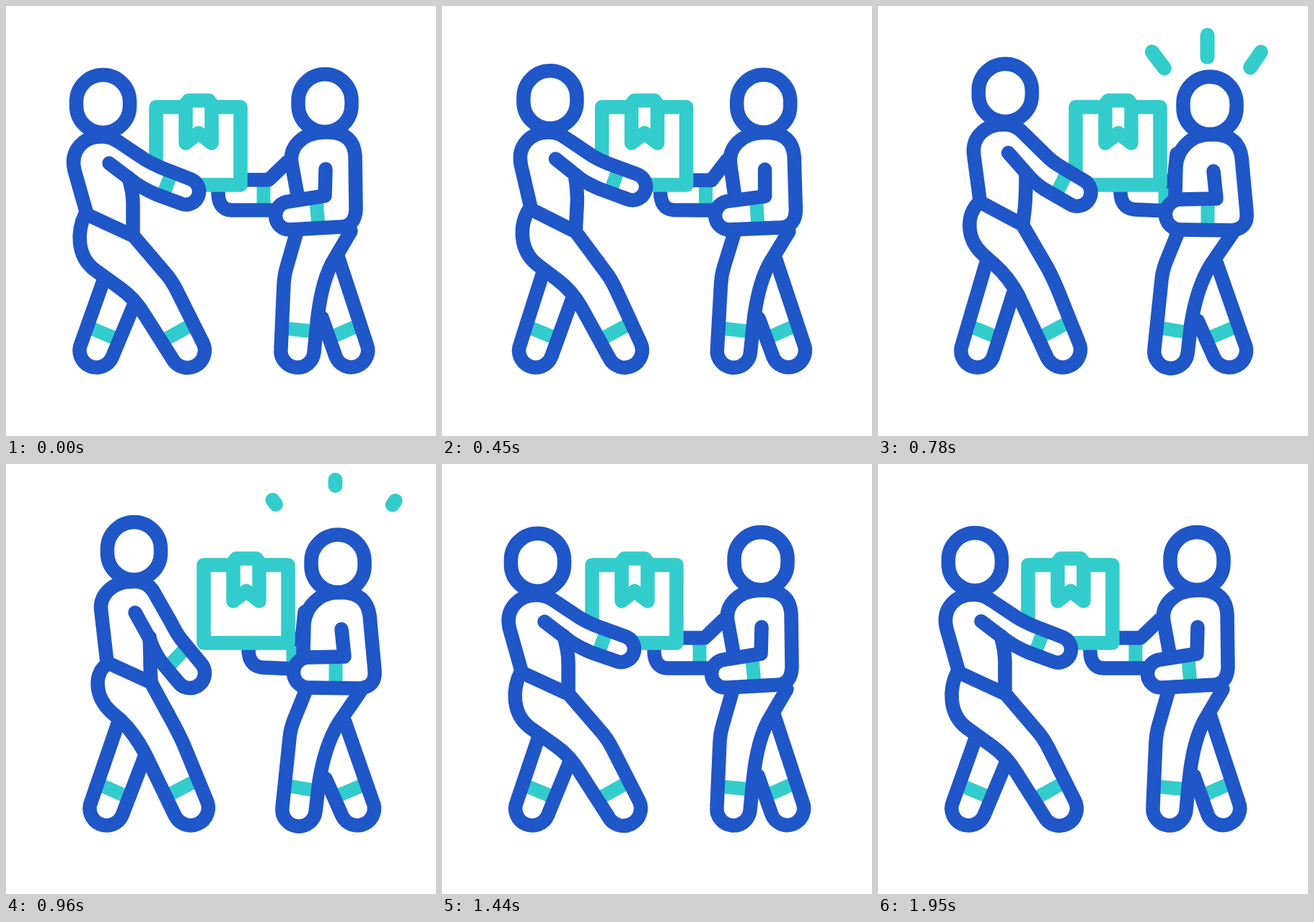
Animation of 596x596 px, one loop 2250 ms. Source, as an HTML page with a canvas:

```html
<!DOCTYPE html>
<html>
<head>
<meta charset="utf-8">
<style>
html, body { margin: 0; width: 100%; height: 100%; overflow: hidden; background: #fff; }
canvas { display: block; }
</style>
</head>
<body>
<canvas id="stage" width="596" height="596"></canvas>
<script>
const ctx = document.getElementById('stage').getContext('2d');
const BLUE = '#1f56c8', TEAL = '#33cccc', LOOP = 2250, STEP = 30;

const head = (x, y) =>
  `M${x - 37} ${y + 3}v-6a37 37 0 0 1 74 0v6a37 37 0 0 1 -74 0z`;

// Poses: resting, leaning back, stretched while holding, arms released.
// Arcs of radius 1 grow to half circles between their end points.
const left = {
  backLeg: [
    'M136 378L104 468A1 1 0 0 0 147 487L180 408',
    'M125 378L102 470A1 1 0 0 0 145 486L174 406',
    'M147 353L115 470A1 1 0 0 0 158 486L184 396',
    'M155 360L118 468A1 1 0 0 0 161 487L192 406'],
  backBand: [
    'M114 445L157 463', 'M111 444L153 461', 'M124 443L165 459', 'M129 444L170 462'],
  frontLeg: [
    'M110 288C98 312 98 346 122 365L158 391Q178 405 192 428L230 488A1 1 0 0 0 273 467L238 397Q230 380 218 367L177 319Z',
    'M105 290C93 314 93 346 118 364L158 391Q170 399 186 423L229 487A1 1 0 0 0 274 467L234 395Q227 381 216 370L170 320Z',
    'M138 270C120 290 120 325 144 346L162 362Q182 378 196 404L234 487A1 1 0 0 0 278 466L250 396Q243 378 236 366L198 304Z',
    'M142 276C121 289 122 322 146 344L160 356Q178 374 192 400L234 487A1 1 0 0 0 278 466L246 388Q240 375 231 358L201 303Z'],
  frontBand: [
    'M219 463L257 442', 'M218 463L256 441', 'M225 459L263 439', 'M225 459L263 439'],
  body: [
    'M112 288L95 228C88 200 108 180 134 181Q146 181 157 189L193 213Q203 219 215 224L256 240A1 1 0 0 1 243 274L208 261Q192 254 180 246L143 218',
    'M104 290L88 231C80 202 104 184 126 185Q138 185 149 193L184 215Q194 221 206 225L249 236A1 1 0 0 1 237 271L202 262Q186 257 174 250L137 221',
    'M140 268L131 210C127 184 146 165 172 166Q184 166 195 175L232 200Q242 206 253 210L292 223A1 1 0 0 1 280 259L238 244Q222 238 211 231L179 203',
    'M140 275L132 205C128 182 148 163 174 163Q194 161 204 176L229 220Q236 234 242 242L270 276A1 1 0 0 1 240 304L215 274Q205 260 199 242L179 206'],
  armBand: [
    'M230 230L217 264', 'M223 227L212 262', 'M268 215L257 250', 'M252 252L224 282'],
  belly: [
    'M176 318L176 275Q176 258 170 238', 'M171 320L171 280Q170 258 163 240',
    'M199 304L204 275Q206 255 206 232', 'M201 303L200 280Q200 262 199 240'],
  head: [head(134.5, 135.5), head(123.5, 139), head(173, 121), head(177.5, 120.5)]
};

// Poses: box given away, box pulled close
const right = {
  rearArm: [
    'M390 216L364 241L330 241M375 283L312 283Q294 282 294 258',
    'M414 205L410 243L395 243M400 284L355 282Q336 280 336 256'],
  rearBand: ['M357 243L357 280', 'M398 245L398 280'],
  backLeg: [
    'M461 350L500 469A1 1 0 0 1 457 486L438 432',
    'M470 358L508 467A1 1 0 0 1 466 488L443 436'],
  backBand: ['M449 460L492 441', 'M455 462L497 444'],
  frontLeg: [
    'M403 313L389 362Q386 372 385 385L381 476A1 1 0 0 0 427 480L431 440Q436 388 451 358L478 312',
    'M416 313L399 355Q394 368 393 380L383 476A1 1 0 0 0 429 482L434 440Q442 390 461 359L492 314'],
  frontBand: ['M386 447L428 451', 'M390 446L432 453'],
  body: [
    'M443 226L442 263L392 271A1 1 0 0 0 394 310L466 306Q484 304 485 282L484 208Q482 176 448 175L440 175C410 176 392 196 396 218L404 262',
    'M465 229L469 267L419 268A1 1 0 0 0 420 310L490 311Q513 309 511 286L504 210Q500 180 468 178L458 178C434 179 415 198 413 222L412 262'],
  armBand: ['M430 268L433 306', 'M457 270L457 308'],
  head: [head(442, 134.5), head(460, 138)]
};

// Each spark: start point, end point
const sparks = [[79, 83, 51, 46], [138, 68, 138, 18], [197, 82, 221, 47]];

const clamp = v => Math.max(0, Math.min(1, v));
const ramp = (t, a, b) => clamp((t - a) / (b - a));
const ease = (t, a, b) => { const u = ramp(t, a, b); return u * u * (3 - 2 * u); };

const NUMBER = /-?[\d.]+/g;

// Blend the first pose toward the others by their weights.
// Rounding to a plain number keeps arc flags as a bare 0 or 1.
function blend(poses, weights) {
  const nums = poses.map(p => p.match(NUMBER).map(Number));
  let i = 0;
  return poses[0].replace(NUMBER, () => {
    const base = nums[0][i];
    const v = weights.reduce((sum, w, k) => sum + w * (nums[k + 1][i] - base), base);
    i++;
    return Math.round(v * 100) / 100;
  });
}

function stroke(d, color = BLUE, width = 19.5, cap = 'round') {
  ctx.strokeStyle = color;
  ctx.lineWidth = width;
  ctx.lineCap = cap;
  ctx.lineJoin = 'round';
  ctx.stroke(new Path2D(d));
}

function fill(d) {
  ctx.fillStyle = '#fff';
  ctx.fill(new Path2D(d));
}

function limb(shape, band, weights, filled = true) {
  const d = blend(shape, weights);
  if (filled) fill(d);
  stroke(blend(band, weights), TEAL, 19, 'butt');
  stroke(d);
}

function drawBox(shift) {
  ctx.save();
  ctx.translate(shift, 0);
  for (const d of ['M208 140H325V248H208Z', 'M249 190V136L253 131H281L285 136V190L267 176Z']) {
    fill(d);
    stroke(d, TEAL);
  }
  ctx.restore();
}

function drawSparks(age, dx, dy) {
  const tip = ramp(age, 0, 150), tail = ramp(age, 90, 310);
  if (age < 0 || tail >= 1) return;
  for (const [x0, y0, x1, y1] of sparks) {
    const at = u => `${x0 + (x1 - x0) * u + dx} ${y0 + (y1 - y0) * u + dy}`;
    stroke(`M${at(tail)}L${at(tip)}`, TEAL, 20);
  }
}

function draw(t) {
  const pull = ease(t, 343, 709) - ease(t, 1055, 1421);
  const lean = ease(t, 165, 250) - ease(t, 250, 400) + ease(t, 1380, 1600) - ease(t, 1760, 1950);
  const drop = ease(t, 710, 880);
  const hold = 1.07 * ease(t, 265, 710) * (1 - drop);
  const free = drop - ease(t, 1055, 1421);
  const r = [pull], l = [lean, hold, free];

  ctx.clearRect(0, 0, 596, 596);
  limb(right.rearArm, right.rearBand, r, false);
  drawBox(66 * pull);
  limb(right.backLeg, right.backBand, r);
  limb(right.frontLeg, right.frontBand, r);
  limb(right.body, right.armBand, r);
  stroke(blend(right.head, r));

  limb(left.backLeg, left.backBand, l);
  limb(left.frontLeg, left.frontBand, l);
  limb(left.body, left.armBand, l);
  stroke(blend(left.belly, l));
  stroke(blend(left.head, l));

  drawSparks(t - 685, 318.5, 4);
  drawSparks(t - 1493, 0, 0);
}

const start = performance.now();
function tick() {
  const t = (performance.now() - start) % LOOP;
  draw(Math.floor(t / STEP) * STEP);
  requestAnimationFrame(tick);
}
tick();
</script>
</body>
</html>
```
